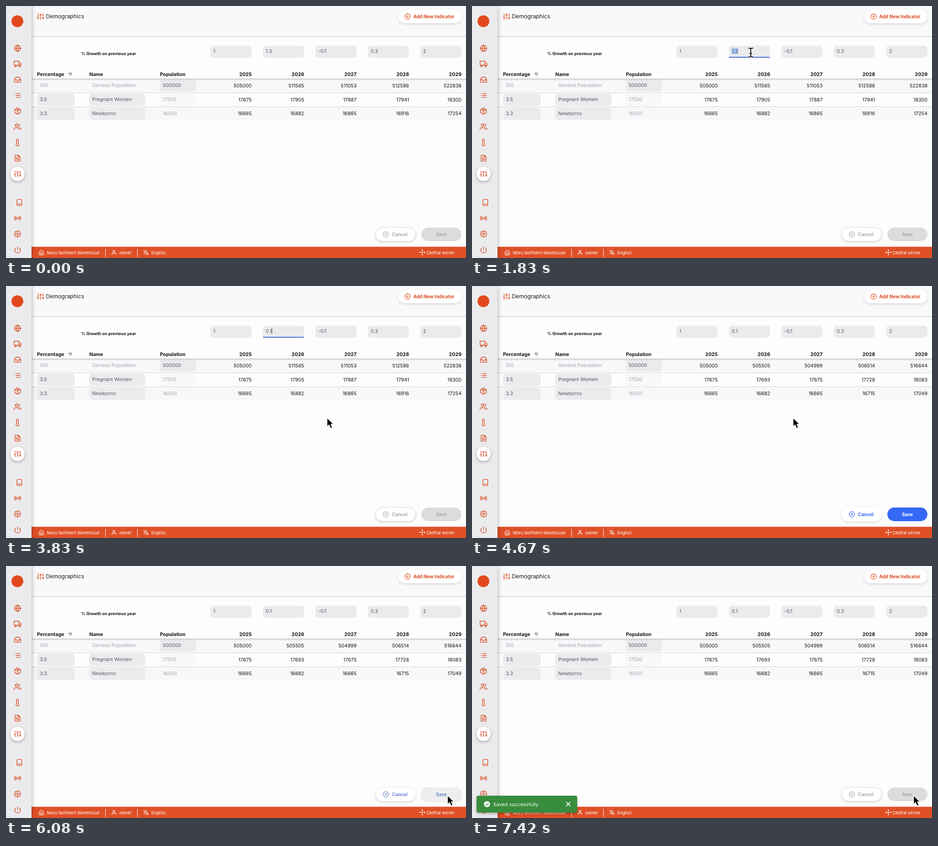
Animation, 1010 px wide and 554 px high, one loop 7500 ms. Source, as an HTML page:

```html
<!DOCTYPE html>
<html lang="en">
<head>
<meta charset="utf-8">
<title>Demographics</title>
<style>
  html, body { margin: 0; width: 100%; height: 100%; overflow: hidden; background: #fdfdfd; }
  svg { display: block; width: 100vw; height: 100vh; }
  text { font: 400 10.7px Inter, sans-serif; white-space: pre; }
  .bold { font-weight: 700; }
  .button { font-size: 10px; font-weight: 700; }
  .foot { font-size: 9.2px; fill: #fff; }
  .field { fill: #555662; }
  .off { fill: #a6a6ac; }
  .cell { fill: #17171c; }
  .icon { fill: none; stroke-width: 2; stroke-linecap: round; stroke-linejoin: round; }
</style>
</head>
<body>
<svg id="stage" viewBox="0 0 1010 554" preserveAspectRatio="none">
  <defs>
    <linearGradient id="edge">
      <stop offset="0" stop-color="#000" stop-opacity=".17"/>
      <stop offset=".45" stop-color="#000" stop-opacity=".05"/>
      <stop offset="1" stop-color="#000" stop-opacity="0"/>
    </linearGradient>
    <linearGradient id="under" x2="0" y2="1">
      <stop offset="0" stop-color="#50506a" stop-opacity=".2"/>
      <stop offset="1" stop-color="#50506a" stop-opacity="0"/>
    </linearGradient>
    <filter id="soft" x="-30%" y="-50%" width="160%" height="220%">
      <feDropShadow dx="0" dy="2" stdDeviation="2.6" flood-color="#606078" flood-opacity=".25"/>
    </filter>
    <filter id="lift" x="-30%" y="-50%" width="160%" height="220%">
      <feDropShadow dx="0" dy="2.5" stdDeviation="3" flood-opacity=".3"/>
    </filter>
  </defs>
  <g id="page"></g>
  <g id="toast" filter="url(#lift)"></g>
  <g id="cursor"></g>
</svg>
<script>
const LOOP = 7500, STEP = 1000 / 12;
const ORANGE = '#d84a20';
const BLUE = [53, 104, 245], WHITE = [255, 255, 255], GRAY = [220, 220, 220], DIM = [168, 168, 168];
const COL = 115.15;

const icons = {
  globe: '<circle cx="12" cy="12" r="10"/><path d="M2 12h20M12 2a15.3 15.3 0 0 1 4 10 15.3 15.3 0 0 1-4 10 15.3 15.3 0 0 1-4-10 15.3 15.3 0 0 1 4-10z"/>',
  truck: '<path d="M1 3h15v13H1zM16 8h4l3 3v5h-7z"/><circle cx="5.5" cy="18.5" r="2.5"/><circle cx="18.5" cy="18.5" r="2.5"/>',
  inbox: '<path d="M22 12h-6l-2 3h-4l-2-3H2M5.45 5.11 2 12v6a2 2 0 0 0 2 2h16a2 2 0 0 0 2-2v-6l-3.45-6.89A2 2 0 0 0 16.76 4H7.24a2 2 0 0 0-1.79 1.11z"/>',
  list: '<path d="M8 6h13M8 12h13M8 18h13M3 6h.01M3 12h.01M3 18h.01"/>',
  box: '<path d="M16.5 9.4l-9-5.19M21 16V8a2 2 0 0 0-1-1.73l-7-4a2 2 0 0 0-2 0l-7 4A2 2 0 0 0 3 8v8a2 2 0 0 0 1 1.73l7 4a2 2 0 0 0 2 0l7-4A2 2 0 0 0 21 16zM3.27 6.96 12 12.01l8.73-5.05M12 22.08V12"/>',
  users: '<path d="M17 21v-2a4 4 0 0 0-4-4H5a4 4 0 0 0-4 4v2M23 21v-2a4 4 0 0 0-3-3.87M16 3.13a4 4 0 0 1 0 7.75"/><circle cx="9" cy="7" r="4"/>',
  thermometer: '<path d="M14 14.76V3.5a2.5 2.5 0 0 0-5 0v11.26a4.5 4.5 0 1 0 5 0z"/>',
  file: '<path d="M14 2H6a2 2 0 0 0-2 2v16a2 2 0 0 0 2 2h12a2 2 0 0 0 2-2V8zM14 2v6h6M16 13H8M16 17H8M10 9H8"/>',
  sliders: '<path d="M4 21v-7M4 10V3M12 21v-9M12 8V3M20 21v-5M20 12V3M1 14h6M9 8h6M17 16h6"/>',
  book: '<path d="M4 19.5A2.5 2.5 0 0 1 6.5 17H20M6.5 2H20v20H6.5A2.5 2.5 0 0 1 4 19.5v-15A2.5 2.5 0 0 1 6.5 2z"/>',
  radio: '<circle cx="12" cy="12" r="2"/><path d="M16.24 7.76a6 6 0 0 1 0 8.49m-8.48-.01a6 6 0 0 1 0-8.49m11.31-2.82a10 10 0 0 1 0 14.14m-14.14 0a10 10 0 0 1 0-14.14"/>',
  settings: '<circle cx="12" cy="12" r="3"/><path d="M19.4 15a1.65 1.65 0 0 0 .33 1.82l.06.06a2 2 0 0 1-2.83 2.83l-.06-.06a1.65 1.65 0 0 0-2.82 1.17V21a2 2 0 0 1-4 0v-.09A1.65 1.65 0 0 0 9 19.4a1.65 1.65 0 0 0-1.82.33l-.06.06a2 2 0 0 1-2.83-2.83l.06-.06a1.65 1.65 0 0 0-1.17-2.82H3a2 2 0 0 1 0-4h.09A1.65 1.65 0 0 0 4.6 9a1.65 1.65 0 0 0-.33-1.82l-.06-.06a2 2 0 0 1 2.83-2.83l.06.06A1.65 1.65 0 0 0 9 4.68a1.65 1.65 0 0 0 1-1.51V3a2 2 0 0 1 4 0v.09a1.65 1.65 0 0 0 2.82 1.17l.06-.06a2 2 0 0 1 2.83 2.83l-.06.06A1.65 1.65 0 0 0 19.4 9a1.65 1.65 0 0 0 1.51 1H21a2 2 0 0 1 0 4h-.09a1.65 1.65 0 0 0-1.51 1z"/>',
  power: '<path d="M18.36 6.64a9 9 0 1 1-12.73 0M12 2v10"/>',
  plus: '<circle cx="12" cy="12" r="10"/><path d="M12 8v8M8 12h8"/>',
  cross: '<circle cx="12" cy="12" r="10"/><path d="M15 9l-6 6M9 9l6 6"/>',
  home: '<path d="M3 9l9-7 9 7v11a2 2 0 0 1-2 2H5a2 2 0 0 1-2-2zM9 22V12h6v10"/>',
  user: '<path d="M20 21v-2a4 4 0 0 0-4-4H8a4 4 0 0 0-4 4v2"/><circle cx="12" cy="7" r="4"/>',
  translate: '<path fill="#fff" stroke="none" d="M12.87 15.07l-2.54-2.51.03-.03A17.5 17.5 0 0 0 14.07 6H17V4h-7V2H8v2H1v2h11.17C11.5 7.92 10.44 9.75 9 11.35 8.07 10.32 7.3 9.19 6.69 8h-2c.73 1.63 1.73 3.17 2.98 4.56l-5.09 5.02L4 19l5-5 3.11 3.11zM18.5 10h-2L12 22h2l1.12-3h4.75L21 22h2zm-2.62 7l1.62-4.33L19.12 17z"/>',
  hub: '<path stroke-width="1.3" d="M12 6v3M12 15v3M6 12h3M15 12h3"/><g fill="#fff" stroke="none"><circle cx="12" cy="12" r="2.2"/><circle cx="12" cy="3" r="2.4"/><circle cx="12" cy="21" r="2.4"/><circle cx="3" cy="12" r="2.4"/><circle cx="21" cy="12" r="2.4"/></g>'
};

const icon = (name, x, y, scale = .69, color = ORANGE, id = '') =>
  `<g class="icon" id="${id}" stroke="${color}" transform="translate(${x} ${y}) scale(${scale}) translate(-12 -12)">${icons[name]}</g>`;
const rect = (x, y, w, h, fill, extra = '') =>
  `<rect x="${x}" y="${y}" width="${w}" height="${h}" fill="${fill}" ${extra}/>`;
const text = (x, y, str, cls = '', extra = '') =>
  `<text x="${x}" y="${y}" class="${cls}" ${extra}>${str}</text>`;
const box = (x, y, w, fill = '#ebebed', h = 26.5) => rect(x, y, w, h, fill, 'rx="6"');
const right = 'text-anchor="end"';
const $ = id => document.getElementById(id);

const rows = [
  { share: '100', name: 'General Population', base: 500000 },
  { share: '3.5', name: 'Pregnant Women', base: 17500 },
  { share: '3.3', name: 'Newborns', base: 16500 }
];

function header() {
  return rect(56, 0, 954, 67, '#f9f9fb') + rect(56, 66.6, 954, 1.1, '#bdbdc3') +
    icon('sliders', 76, 23) +
    text(87.5, 27.2, 'Demographics', '', 'style="font-size:12.25px" fill="#1c1c21"') +
    rect(861, 8, 139, 30, '#fff', 'rx="15" filter="url(#soft)"') +
    icon('plus', 881.7, 23, .59) +
    text(894.3, 26.7, 'Add New Indicator', 'button', `fill="${ORANGE}"`);
}

function table() {
  let out = text(165, 107.6, '% Growth on previous year', 'bold cell', 'style="font-size:9.15px"');
  for (let i = 0; i < 5; i++) {
    const x = 449 + i * COL;
    out += box(x, 87.3, 90);
    if (i === 1) {
      out += rect(x, 111.8, 90, 1.8, '#3566dc', 'id="line"') +
        rect(570, 92.5, 14.3, 13.5, '#a4c5f3', 'id="mark"');
    }
    out += text(x + 6.2, 103, '', 'field', `id="growth${i}"`);
    out += text(539.5 + i * COL, 154.3, 2025 + i, 'bold cell', right);
  }
  out += rect(0, 92.8, .9, 13, '#26262c', 'id="caret"');
  out += text(68, 154.3, 'Percentage', 'bold cell') + text(183, 154.3, 'Name', 'bold cell') +
    text(338, 154.3, 'Population', 'bold cell') +
    '<path d="M138 147.6h6.8l-3.4 5.6z" fill="none" stroke="#333" stroke-width=".9"/>';
  rows.forEach((row, r) => {
    const top = 160 + r * 30.75, y = top + 18;
    if (r !== 1) out += rect(56, top, 954, 30.75, '#f8f8fb');
    if (r) {
      out += box(68, top + 1.9, 83) + box(183, top + 1.9, 123);
      if (r === 1) out += box(338, top + 1.9, 79, '#f8f8fa');
    } else out += box(338, top + 1.2, 79);
    const cls = r ? 'field' : 'off';
    out += text(74.3, y, row.share, cls) + text(189.2, y, row.name, cls) +
      text(344.2, y, row.base, r ? 'off' : 'field');
    for (let i = 0; i < 5; i++)
      out += text(539.5 + i * COL, y + .9, '', 'cell', `${right} id="cell${r}${i}"`);
    out += rect(56, top - .4, 954, 1, r ? '#d3d3dc' : '#bdbdc8');
  });
  return out + rect(56, 160.6, 954, 4, 'url(#under)');
}

function buttons() {
  return rect(811.5, 487, 88, 30, '#fff', 'id="cancelBox" rx="15" filter="url(#soft)"') +
    icon('cross', 834, 502, .59, '#aaa', 'cancelIcon') +
    text(847.5, 505.7, 'Cancel', 'button', 'id="cancelText"') +
    rect(912, 487, 88, 30, '#000', 'rx="15" filter="url(#soft)" id="saveShade"') +
    rect(912, 487, 88, 30, '#ddd', 'rx="15" id="saveBox"') +
    text(956, 505.7, 'Save', 'button', 'text-anchor="middle" id="saveText"');
}

function footer() {
  return rect(56, 529.3, 954, 25, '#e05026') +
    icon('home', 77.5, 542, .53, '#fff') + text(89.7, 546.4, 'Moru Northern Warehouse', 'foot') +
    rect(218, 534, 1, 18, '#fff') +
    icon('user', 237, 541.8, .53, '#fff') + text(249, 546.4, 'owner', 'foot') +
    rect(288, 534, 1, 18, '#fff') +
    icon('translate', 307, 542, .53, '#fff') + text(319, 546.4, 'English', 'foot') +
    icon('hub', 914, 541.7, .56, '#fff') + text(984.8, 546.4, 'Central server', 'foot', right);
}

function sidebar() {
  const names = ['globe', 'truck', 'inbox', 'list', 'box', 'users', 'thermometer', 'file', 'sliders'];
  return rect(56, 0, 11, 554, 'url(#edge)') + rect(0, 0, 56, 554, '#ebebed') +
    `<circle cx="25" cy="33.5" r="13" fill="#e2491f"/>` +
    `<circle cx="25.3" cy="369" r="15.5" fill="#fff" filter="url(#lift)"/>` +
    names.map((n, i) => icon(n, 25.4, 93 + i * 34.5)).join('') +
    icon('book', 29.3, 432, .66) + icon('radio', 25.4, 466.5) +
    icon('settings', 25.4, 501, .66) + icon('power', 25.4, 536);
}

$('page').innerHTML = rect(56, 0, 954, 554, '#fdfdfd') + header() + table() + buttons() + footer() + sidebar();
$('toast').innerHTML = rect(10, 505, 221, 37, '#378d3d', 'rx="4"') +
  '<circle cx="33" cy="523.5" r="6.6" fill="#fff"/>' +
  '<path d="M30 523.7l2.2 2.2 4-4.4" fill="none" stroke="#378d3d" stroke-width="1.5"/>' +
  '<path d="M206.8 519.1l9 9m0-9l-9 9" stroke="#fff" stroke-width="1.7"/>' +
  text(46.8, 527.5, 'Saved successfully', '', 'fill="#fff" letter-spacing=".1"');
$('cursor').innerHTML =
  '<path id="arrow" d="M0 0V19.2L4.4 15.2 7.7 22.8 11.4 21.2 8.2 13.8H14z" fill="#000" stroke="#fff" stroke-width="1.2"/>' +
  '<g id="beam" fill="none"><path id="bar" d="M-5-9.5Q0-9.5 0-7Q0-9.5 5-9.5M0-7.5V7.5M-5 10Q0 10 0 7.5Q0 10 5 10M-2.5 2.5h5" stroke="#fff" stroke-width="4"/><path d="M-5-9.5Q0-9.5 0-7Q0-9.5 5-9.5M0-7.5V7.5M-5 10Q0 10 0 7.5Q0 10 5 10M-2.5 2.5h5" stroke="#000" stroke-width="1.8"/></g>' +
  '<path id="hand" d="M-1.6 1.6Q-1.4-.5.4-.1Q1.6.2 2 2L3.4 7.6Q4-.0 6.2 6.6Q7.5 5 9 7.6Q10.6 6.2 11.8 8.6Q14.6 12.5 13.2 16.5L12.6 21H3.2Q1.8 17.6-3.6 13.6Q-5.4 11.6-3.6 10.8Q-1.8 10.4.6 12.2zM4.4 12.4v5M7 12.2v5M9.6 12v5" fill="#fff" stroke="#000" stroke-width="1.3" stroke-linejoin="round"/>';

const clamp = v => Math.min(1, Math.max(0, v));
const smooth = p => p * p * (3 - 2 * p);
const ramp = (t, start, span) => smooth(clamp((t - start) / span));
const mix = (a, b, p) => a.map((v, i) => v + (b[i] - v) * p);
const rgb = c => `rgb(${c.map(Math.round)})`;
const show = (id, on) => $(id).setAttribute('visibility', on ? 'inherit' : 'hidden');
const set = (id, key, value) => $(id).setAttribute(key, value);

// cubic-bezier(0, 0, .2, 1)
function easeOut(x) {
  let lo = 0, hi = 1;
  for (let i = 0; i < 20; i++) {
    const u = (lo + hi) / 2;
    if (.6 * u * u + .4 * u ** 3 < x) lo = u; else hi = u;
  }
  return smooth(lo);
}

const path = [[1060, 640, 580], [1560, 612, 102], [3080, 612, 102], [3660, 705, 290],
  [4780, 705, 290], [5400, 974, 510.5], [5750, 974, 510.5], [6000, 969.5, 504.5]];

function pointer(t) {
  let i = path.findIndex(p => p[0] > t);
  if (i < 0) return path[path.length - 1].slice(1);
  if (i === 0) return path[0].slice(1);
  const [a, x, y] = path[i - 1], [b, x2, y2] = path[i];
  return mix([x, y], [x2, y2], ramp(t, a, b - a));
}

function draw(t) {
  const typed = t < 2250 ? '1.3' : '0.1'.slice(0, t < 2500 ? 1 : t < 2750 ? 2 : 3);
  const focus = t >= 1650 && t < 3950;
  const growth = [1, 1.3, -.1, .3, 2];
  if (t >= 4080) growth[1] = .1;

  growth.forEach((g, i) => { $('growth' + i).textContent = i === 1 ? typed : g; });
  rows.forEach((row, r) => {
    let n = row.base;
    growth.forEach((g, i) => {
      n = Math.round(n * (1 + g / 100));
      $(`cell${r}${i}`).textContent = n;
    });
  });

  show('line', focus);
  show('mark', focus && t < 2250);
  show('caret', focus && t >= 2250 && (t < 2750 || (t - 2750) % 1000 < 500));
  set('caret', 'x', 570.4 + $('growth1').getComputedTextLength());

  const on = ramp(t, 4080, 250) * (1 - ramp(t, 5960, 250));
  const hover = ramp(t, 5305, 250);
  const cancel = rgb(mix(DIM, BLUE, on));
  set('cancelBox', 'stroke', rgb(mix(GRAY, WHITE, on)));
  set('cancelIcon', 'stroke', cancel);
  set('cancelText', 'fill', cancel);
  set('saveShade', 'opacity', hover * on);
  set('saveBox', 'fill', rgb(mix(GRAY, mix(BLUE, WHITE, hover), on)));
  set('saveText', 'fill', rgb(mix(DIM, mix(WHITE, BLUE, hover), on)));

  const [x, y] = pointer(t);
  const inField = x > 564 && x < 654 && y > 87 && y < 114;
  const inSave = x > 912 && y > 487 && t < 6000;
  set('cursor', 'transform', `translate(${x} ${y})`);
  show('cursor', t > 1060 && !(t >= 2250 && t < 3080));
  show('beam', inField);
  show('hand', inSave);
  show('arrow', !inField && !inSave);

  const slide = easeOut(clamp((t - 6249) / 225));
  show('toast', t > 6249);
  set('toast', 'transform', `translate(${-241 * (1 - slide)} 0)`);
}

function tick() {
  const t = performance.now() % LOOP;
  draw(Math.floor((t + 5) / STEP) * STEP % LOOP);
  requestAnimationFrame(tick);
}
tick();
</script>
</body>
</html>
```
